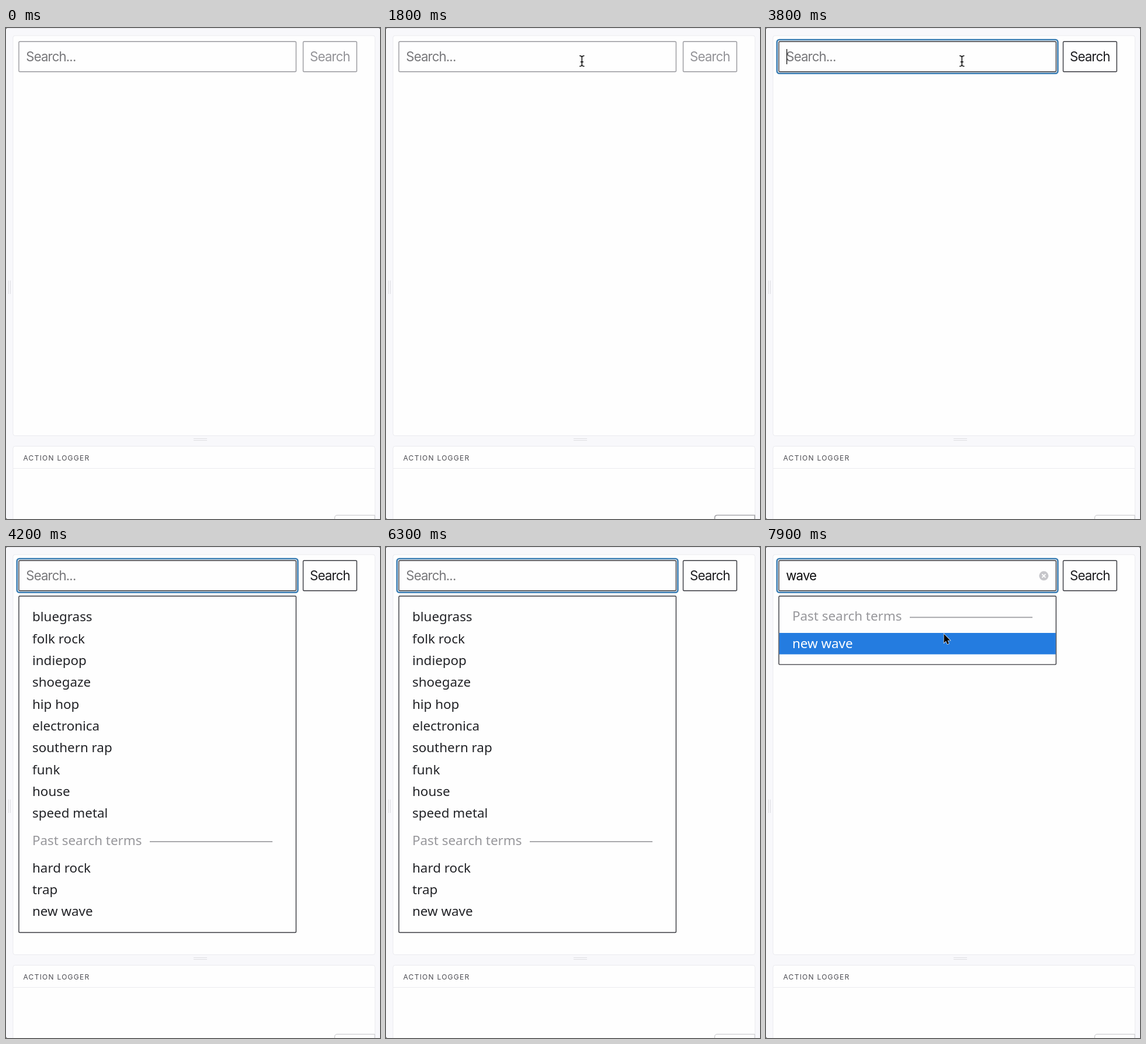
Write an HTML page that moves like this. It is 640 px wide and 840 px high and loops after 8 s.

```html
<!DOCTYPE html>
<html lang="en">
<head>
<meta charset="utf-8">
<title>Search suggestions</title>
<style>
  html, body { margin: 0; width: 100%; height: 100%; overflow: hidden; background: #f8f8fb; }
  svg { display: block; width: 100%; height: 100%; }
  text { white-space: pre; }
  .ui { font: 22.2px Inter, Roboto, sans-serif; letter-spacing: -.85px; }
  .list { font: 22.4px "Noto Sans", "Open Sans", sans-serif; fill: #222327; }
  .list .label { fill: #97979b; }
  .title { font: 12px Inter, Roboto, sans-serif; letter-spacing: 1.25px; fill: #4b4b51; }
  .panel { fill: #fefefe; stroke: #ebebef; }
  .grip { stroke: #dedee2; stroke-width: 1; }
  .box { fill: #fefefe; stroke-width: 1.4; }
</style>
</head>
<body>
<svg viewBox="0 0 640 840">
  <rect width="640" height="840" fill="#f8f8fb"/>
  <path d="M0 .5H640" stroke="#e6e6ea"/>
  <path d="M0 0H2L0 2ZM640 0H638L640 2ZM0 840V838L2 840Z" fill="#77777b"/>
  <rect class="panel" x="12" y="13" width="619.5" height="684.5" rx="3.5"/>
  <rect class="panel" x="12" y="715.5" width="619.5" height="140" rx="3.5"/>
  <path d="M12 753.5H631" stroke="#ebebef"/>
  <path class="grip" d="M4.5 432V455M7.5 432V455M321 702.5H344M321 705.5H344"/>
  <text class="title" x="29.5" y="739.6">ACTION LOGGER</text>
  <path id="corner" d="M631 833.5H567Q562.5 833.5 562.5 838V841H631Z" fill="#fefefe"/>

  <rect id="ring" x="18.8" y="20" width="480.6" height="57.8" rx="4" fill="#fefefe" stroke="#3a7db3" stroke-width="2.6"/>
  <rect id="field" class="box" x="22" y="23.2" width="474.4" height="51.6" rx="1.5"/>
  <rect id="button" class="box" x="508.5" y="23.2" width="91.8" height="51.6" rx="1.5"/>
  <text id="buttonText" class="ui" x="520" y="57.3">Search</text>
  <text id="query" class="ui" x="34.3" y="57.3"></text>
  <path id="caret" d="M0 36V62" stroke="#111" stroke-width="1.3"/>
  <g id="clear">
    <circle cx="475.4" cy="49.3" r="8" fill="#c6c6ca"/>
    <path d="M472.4 46.3l6 6m0-6l-6 6" stroke="#fff" stroke-width="1.8"/>
  </g>
  <g id="full" class="list"></g>
  <g id="short" class="list"></g>

  <path id="arrow" d="M.5 .8V16L4 12.7L6.4 18.2L9 17.1L6.6 11.7H11.2Z" fill="#000" stroke="#fff" stroke-width="1.3" paint-order="stroke"/>
  <g id="beam" fill="none" stroke-linecap="round">
    <path id="beamShape" d="M-3.6 -9Q-.6 -9 0 -6.6Q.6 -9 3.6 -9M0 -6.6V6.6M-3.6 9Q-.6 9 0 6.6Q.6 9 3.6 9M-2 1.5H2" stroke="#fff" stroke-width="3"/>
    <use href="#beamShape"/>
  </g>
</svg>
<script>
const $ = id => document.getElementById(id);
const LOOP = 8000, STEP = 100;
const FOCUS = 2400, OPEN = 4200, MOUSE_BACK = 7400;
const TYPING = [[6600, "w"], [6800, "wa"], [7100, "wav"], [7200, "wave"]];
const PATH = [
  [100, 389, 737], [200, 331, 148], [400, 331, 148], [600, 326, 105],
  [1000, 352, 211], [1200, 352, 211], [1800, 335.3, 56.5],
  [7300, 335.3, 56.5], [7700, 309, 160], [7900, 304, 148]
];
const GENRES = ["bluegrass", "folk rock", "indiepop", "shoegaze", "hip hop",
  "electronica", "southern rap", "funk", "house", "speed metal"];
const PAST = ["hard rock", "trap", "new wave"];
const ROW = 37.33, TOP = 84;

const textAt = (y, s, attrs = "") => `<text x="45" y="${y}" ${attrs}>${s}</text>`;

function menu(genres, past) {
  let y = 127.2, out = "";
  for (const g of genres) { out += textAt(y, g); y += ROW; }
  y += genres.length ? 9.5 : -1;
  out += textAt(y, "Past search terms", 'class="label"') +
    `<path d="M246 ${y - 5.8}H456" stroke="#9d9da1" stroke-width="1.7"/>`;
  y += 46.5;
  const hover = `<rect class="hover" x="22.7" y="${y - 25.7}" width="473" height="36.6" fill="#247ce0"/>`;
  let rows = "";
  for (const p of past) { rows += textAt(y, p, 'class="past"'); y += ROW; }
  const height = y - ROW + 28.4 - TOP;
  return `<rect class="box" x="22" y="${TOP}" width="474.4" height="${height}" rx="1.5" stroke="#36373d"/>` +
    out + hover + rows;
}

$("full").innerHTML = menu(GENRES, PAST);
$("short").innerHTML = menu([], PAST.slice(2));
$("full").querySelector(".hover").remove();
$("beam").lastElementChild.remove();
const ink = $("beamShape").cloneNode();
ink.removeAttribute("id");
ink.setAttribute("stroke", "#000");
ink.setAttribute("stroke-width", "1.4");
$("beam").append(ink);

const show = (el, on) => el.setAttribute("visibility", on ? "inherit" : "hidden");
const place = (el, x, y) => el.setAttribute("transform", `translate(${x} ${y})`);
const paint = (id, attr, color) => $(id).setAttribute(attr, color);

function pointer(t) {
  let i = PATH.findIndex(p => p[0] > t);
  if (i < 0) return PATH[PATH.length - 1].slice(1);
  if (i === 0) return PATH[0].slice(1);
  const [t0, x0, y0] = PATH[i - 1], [t1, x1, y1] = PATH[i];
  const u = (t - t0) / (t1 - t0), k = u * u * (3 - 2 * u);
  return [x0 + (x1 - x0) * k, y0 + (y1 - y0) * k];
}

function draw(time) {
  const t = Math.floor((time % LOOP) / STEP) * STEP;
  const focused = t >= FOCUS;
  const typed = TYPING.filter(k => t >= k[0]).pop();
  const query = typed ? typed[1] : "";

  show($("ring"), focused);
  paint("field", "stroke", focused ? "#36373d" : "#98989d");
  paint("button", "stroke", focused ? "#36373d" : "#98989d");
  paint("buttonText", "fill", focused ? "#1d1d20" : "#939397");
  const dark = t >= 500 && t < FOCUS;
  paint("corner", "stroke", dark ? "#a6a6aa" : "#c6c6ca");
  paint("corner", "stroke-width", dark ? 1.7 : 1);

  $("query").textContent = query || "Search...";
  paint("query", "fill", query ? "#0c0c0e" : "#77777a");
  show($("clear"), query);
  const since = t - (typed ? typed[0] : FOCUS);
  show($("caret"), focused && since % 1000 < 500);
  place($("caret"), query ? 34.6 + $("query").getComputedTextLength() : 35.6, 0);

  show($("full"), t >= OPEN && !query);
  show($("short"), query);

  const [x, y] = pointer(t);
  const visible = t >= 100 && (t < OPEN || t >= MOUSE_BACK);
  const overField = x > 22 && x < 496 && y > 23 && y < 75;
  const hover = Boolean(query) && visible && y >= 147 && y < 184;
  show($("arrow"), visible && !overField);
  show($("beam"), visible && overField);
  place($("arrow"), x, y);
  place($("beam"), x, y);

  show($("short").querySelector(".hover"), hover);
  $("short").querySelector(".past").style.fill = hover ? "#fff" : "";
}

const start = performance.now();
function tick() {
  draw(performance.now() - start);
  requestAnimationFrame(tick);
}
tick();
</script>
</body>
</html>
```
